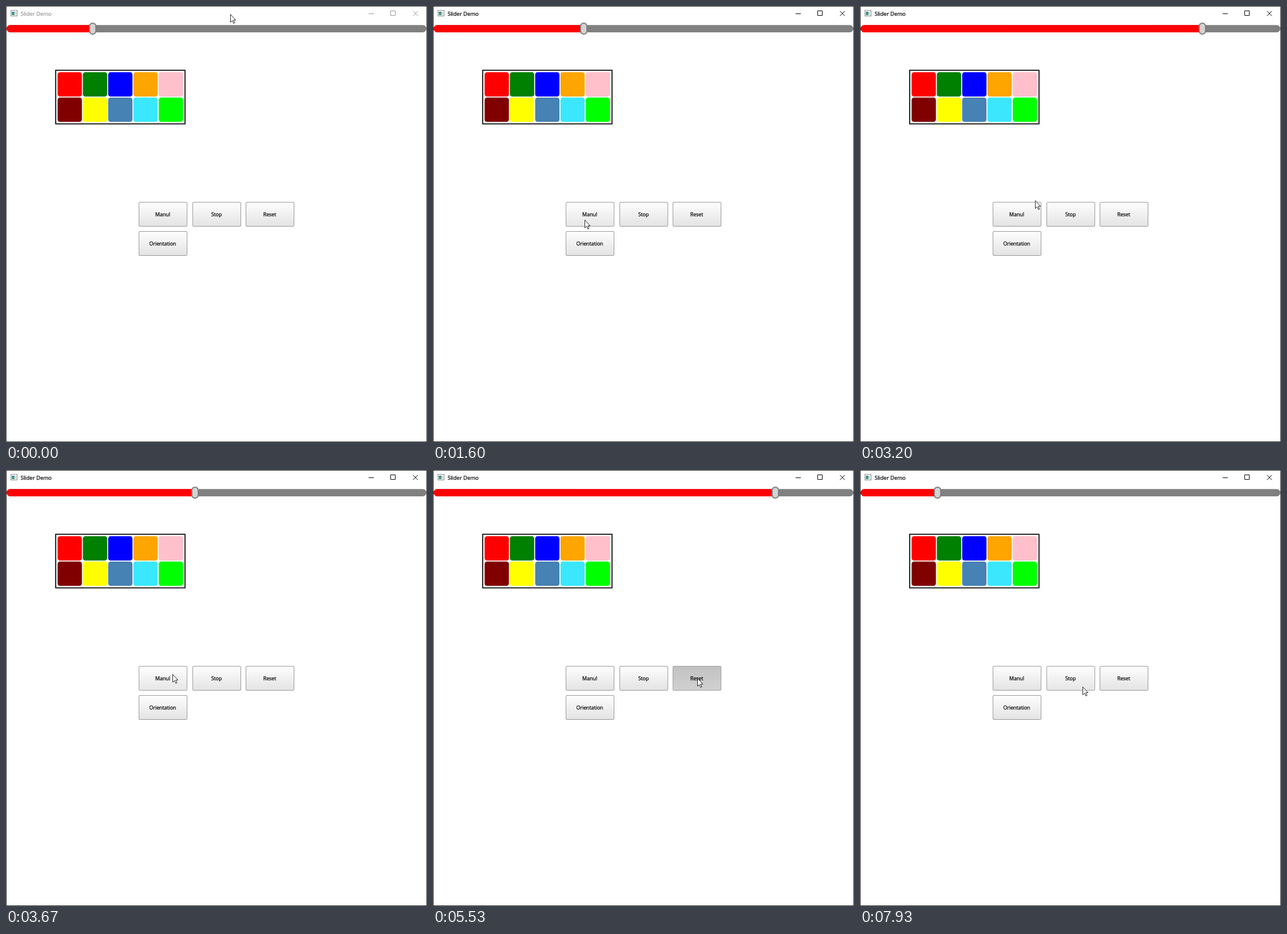
An HTML page for the animation above (8 s loop, 736 px wide and 761 px high).

```html
<!DOCTYPE html>
<html lang="en">
<head>
<meta charset="utf-8">
<title>Slider Demo</title>
<style>
html, body { margin: 0; width: 100%; height: 100%; overflow: hidden; background: #fff; }
svg { display: block; }
text { font-family: "Open Sans", "Noto Sans", sans-serif; stroke-width: .25px; }
</style>
</head>
<body>
<svg width="736" height="761" viewBox="0 0 736 761">
  <defs>
    <linearGradient id="up" x2="0" y2="1"><stop stop-color="#fefefe"/><stop offset="1" stop-color="#e3e3e3"/></linearGradient>
    <linearGradient id="down" x2="0" y2="1"><stop stop-color="#bababa"/><stop offset="1" stop-color="#ccc"/></linearGradient>
    <linearGradient id="teal" x2="1" y2="1"><stop stop-color="#3f7f96"/><stop offset="1" stop-color="#4fae84"/></linearGradient>
  </defs>
  <rect width="736" height="761" fill="#fff"/>
  <rect id="frame" x=".5" y=".5" width="735" height="760" fill="none"/>

  <rect x="8.5" y="7.5" width="11" height="10" fill="#f4f4f4" stroke="#8d9499"/>
  <rect x="10" y="10" width="5" height="6" fill="url(#teal)"/>
  <rect x="16" y="10" width="2" height="6" fill="#cfd4d6"/>
  <text id="caption" x="25.5" y="17" font-size="9.5">Slider Demo</text>
  <path id="controls" d="M634 13.5H643M672.5 8.5h8v8h-8zM711.5 8.8l8.5 8.5M720 8.8l-8.5 8.5" fill="none"/>

  <rect x="1" y="33.2" width="734" height="12.75" rx="6.4" fill="#808080"/>
  <rect id="fill" x="1" y="33.2" height="12.75" rx="6.4" fill="#f00"/>
  <rect id="knob" y="30" width="11" height="19" rx="5.2" fill="#d3d3d3" stroke="#808080" stroke-width="2"/>

  <rect x="86.85" y="112.2" width="226.1" height="93.5" fill="none" stroke="#000" stroke-width="1.7"/>
  <g id="swatches"></g>
  <g id="buttons"></g>
  <path id="cursor" d="M.5 .6V14.4L3.7 11.5L5.9 16.4L7.9 15.5L5.7 10.7H9.7Z" fill="#fff" stroke="#111" stroke-width=".9"/>
</svg>
<script>
const LOOP = 8000, STEP = 1000 / 15, SLIDE = 480, PRESS = 133, SCALE = .85;
const $ = id => document.getElementById(id);

function set(el, attrs) {
  for (const key in attrs) el.setAttribute(key, attrs[key]);
}
function add(parent, tag, attrs, label = "") {
  const el = document.createElementNS("http://www.w3.org/2000/svg", tag);
  set(el, attrs);
  el.textContent = label;
  parent.appendChild(el);
  return el;
}

const colors = ["red", "green", "blue", "orange", "pink",
  "maroon", "yellow", "steelblue", "#3be7fd", "lime"];
colors.forEach((fill, i) => add($("swatches"), "rect", {
  x: 90.2 + 52 * SCALE * (i % 5), y: 115.5 + 52 * SCALE * Math.floor(i / 5),
  width: 50 * SCALE, height: 50 * SCALE, rx: 5 * SCALE, fill
}));

const buttons = ["Manul", "Stop", "Reset", "Orientation"].map((label, i) => {
  const x = Math.round(232 + 110 * SCALE * (i % 3));
  const y = 342 + 60 * SCALE * Math.floor(i / 3);
  const box = { x: x + .5, y: y + .5, width: 84, height: 42, rx: 1.5 };
  const face = add($("buttons"), "rect", { ...box, stroke: "#999" });
  const glow = add($("buttons"), "rect", { ...box, fill: "#fff" });
  add($("buttons"), "text", {
    x: x + 42, y: y + 25, "font-size": 8.8, "text-anchor": "middle", stroke: "#000"
  }, label);
  return { label, x, y, face, glow };
});

// every move: start time, duration, then where it ends
const pointer = [
  [70, 430, 157, 335], [500, 170, 178, 418], [670, 130, 221, 394], [800, 133, 259, 371],
  [933, 267, 265, 373], [1600, 600, 557, 34], [2200, 133, 533, 24], [2333, 734, 321, 321],
  [3067, 266, 291, 356], [4270, 130, 295, 361], [4670, 463, 416, 370], [5133, 267, 462, 363],
  [6000, 267, 383, 368], [7610, 323, 389, 378]
];
const slider = [[1480, 592], [3399, 112], [4339, 592], [6650, 68], [7650, 172]]
  .map(([at, to]) => [at, SLIDE, to]);
const presses = [["Manul", 1400], ["Manul", 3333], ["Reset", 5533]];

function follow(from, moves, t) {
  return moves.reduce((pos, [at, span, ...to]) => {
    const p = Math.min(1, Math.max(0, (t - at) / span));
    return pos.map((v, i) => v + (to[i] - v) * p);
  }, from).map(Math.round);
}

function draw(time) {
  // the picture advances 15 times a second
  const t = Math.floor((time % LOOP + 4) / STEP) % 120 * STEP + .5;
  const active = t >= 1400;
  const ink = active ? "#000" : "#999";
  set($("frame"), { stroke: active ? "#2b2b2b" : "#4a4a4a" });
  set($("caption"), { fill: ink, stroke: ink });
  set($("controls"), { stroke: ink });

  const [left] = follow([145], slider, t);
  set($("fill"), { width: left + 5.5 });
  set($("knob"), { x: left + 1 });

  const [x, y] = follow([392, 14], pointer, t);
  set($("cursor"), { transform: `translate(${x} ${y})` });
  for (const b of buttons) {
    const held = presses.some(([label, at]) => label === b.label && t >= at && t < at + PRESS);
    const over = x >= b.x && x < b.x + 85 && y >= b.y && y < b.y + 43;
    set(b.face, { fill: `url(#${held ? "down" : "up"})` });
    set(b.glow, { opacity: over ? .1 : 0 });
  }
}

const start = performance.now();
function tick() {
  draw(performance.now() - start);
  requestAnimationFrame(tick);
}
tick();
</script>
</body>
</html>
```
